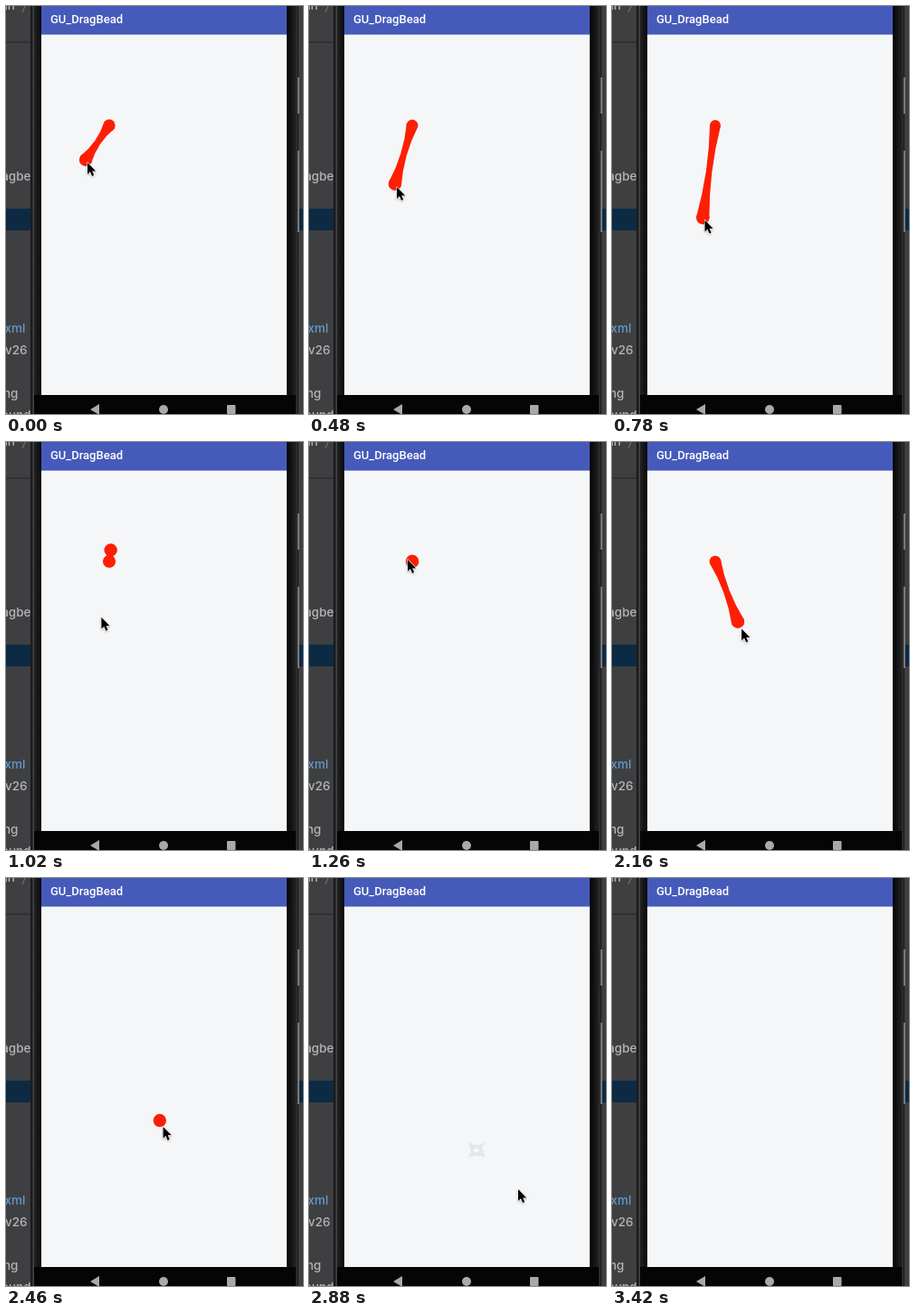
An HTML page for the animation above (3.6 s loop, 328 by 451 pixels).

```html
<!DOCTYPE html>
<html lang="en">
<head>
<meta charset="utf-8">
<title>Sticky bead</title>
<style>
  html, body { margin: 0; width: 100%; height: 100%; overflow: hidden; background: #3e3f41; }
  svg { display: block; width: 328px; height: 451px; }
  .label { font: 500 13.5px Inter, Roboto, sans-serif; fill: #b3b5b7; text-anchor: end; }
  .title { font: 500 13px Roboto, sans-serif; fill: #fff; }
  #pointer { filter: drop-shadow(0 1px 1px #0004); }
</style>
</head>
<body>
<svg viewBox="0 0 328 451">
  <defs>
    <linearGradient id="bezel">
      <stop offset="0" stop-color="#222"/>
      <stop offset=".03" stop-color="#080808"/>
      <stop offset=".97" stop-color="#080808"/>
      <stop offset="1" stop-color="#222"/>
    </linearGradient>
  </defs>
  <rect width="328" height="451" fill="#3e3f41"/>
  <rect y="39" width="28" height="2" fill="#303133"/>
  <rect y="224" width="328" height="24" fill="#0d2a44"/>
  <g class="label">
    <text x="10" y="4">in</text>
    <text x="27.5" y="193">agbe</text>
    <text x="21.5" y="361" style="fill:#6299cc">xml</text>
    <text x="23.5" y="385">v26</text>
    <text x="13.5" y="433">ng</text>
    <text x="27.5" y="457">ound</text>
  </g>
  <path d="M22 -2L18 7" stroke="#77797b" fill="none"/>

  <rect x="27" width="296" height="451" fill="#1b1b1c"/>
  <rect x="29.5" width="1.5" height="451" fill="#444546"/>
  <rect x="31" width="289" height="451" fill="url(#bezel)"/>
  <rect x="320" width="2" height="451" fill="#2b2c2d"/>
  <path d="M323 79V119M323 160V250" stroke="#77797a" stroke-width="2"/>

  <rect x="39" width="271" height="430" fill="#f5f6f8"/>
  <rect x="39" width="271" height="31.6" fill="#465aba"/>
  <text class="title" x="49" y="19">GU_DragBead</text>
  <rect x="31" y="430" width="289" height="21" fill="#050505"/>
  <g fill="#a9a9a9">
    <path d="M93 446L103 440V452Z"/>
    <circle cx="174" cy="446" r="5"/>
    <rect x="244" y="441" width="9.5" height="10" rx="1"/>
  </g>

  <g id="bead" fill="#fe1e04">
    <circle id="root" cx="114" cy="132"/>
    <path id="neck"/>
    <circle id="ball"/>
  </g>
  <path id="puff" fill="#e1e3e5"
        d="M-9 -9L-3 -6H3L9 -9L6 -2L10 8L3 6H-3L-10 8L-6 2ZM-4 0L-1 3L3 1L1 -3Z"/>
  <path id="pointer" d="M0 0V14L3.2 11.1L5.5 16.3L7.8 15.3L5.6 10.3H10Z"
        stroke="#fff" stroke-width="1.2" paint-order="stroke" stroke-linejoin="round"/>
</svg>
<script>
const LOOP = 3600, STEP = 60, LAG = 20;
const ROOT = { x: 114, y: 132 }, GRIP = { x: -2, y: -3 };
const BALL = 7.2, SNAP = 130;
const RELEASE = 840, SPRING = 240, GRAB = 1680, POP = 2700, FADE = 300, EXIT = 3420;

// Pointer stops: time, x, y
const stops = [
  [120, 90, 173], [480, 97, 200], [720, 102, 238], [RELEASE, 103, 235],
  [1260, 109, 130], [GRAB, 110, 132], [2730, 186, 303], [2880, 231, 344],
  [3240, 56, 429], [EXIT, 46, 452]
];

const [root, neck, ball, bead, puff, pointer] =
  ["root", "neck", "ball", "bead", "puff", "pointer"].map(id => document.getElementById(id));
const set = (el, attrs) => {
  for (const key in attrs) el.setAttribute(key, attrs[key]);
};
const show = (el, on) => set(el, { visibility: on ? "visible" : "hidden" });
const mix = (a, b, k) => ({ x: a.x + (b.x - a.x) * k, y: a.y + (b.y - a.y) * k });
const clamp = k => Math.min(1, Math.max(0, k));
const smooth = k => k * k * (3 - 2 * k);

function overshoot(k, tension = 3) {
  const u = k - 1;
  return u * u * ((tension + 1) * u + tension) + 1;
}

function pointerAt(t) {
  const next = stops.findIndex(s => s[0] > t);
  const i = next < 0 ? stops.length - 1 : Math.max(1, next);
  const [t0, x0, y0] = stops[i - 1], [t1, x1, y1] = stops[i];
  return mix({ x: x0, y: y0 }, { x: x1, y: y1 }, smooth(clamp((t - t0) / (t1 - t0))));
}

// The held ball trails the pointer slightly; a released one springs home.
function ballAt(t) {
  const free = t > RELEASE && t <= GRAB;
  const p = pointerAt(free ? RELEASE : t - LAG);
  const held = { x: p.x + GRIP.x, y: p.y + GRIP.y };
  return free ? mix(held, ROOT, overshoot(clamp((t - RELEASE) / SPRING))) : held;
}

function drawBead({ x, y }) {
  const dx = x - ROOT.x, dy = y - ROOT.y, dist = Math.hypot(dx, dy);
  const joined = dist < SNAP;
  const r = BALL - dist * 0.012;
  set(ball, { cx: x, cy: y, r: BALL });
  set(root, { r: joined ? r : 0 });
  if (!joined || dist < 1) return set(neck, { d: "" });
  const nx = -dy / dist, ny = dx / dist;
  const mid = `${ROOT.x + dx / 2} ${ROOT.y + dy / 2}`;
  const rim = (cx, cy, k) => `${cx + nx * k} ${cy + ny * k}`;
  set(neck, {
    d: `M${rim(ROOT.x, ROOT.y, r)}Q${mid} ${rim(x, y, BALL)}` +
       `L${rim(x, y, -BALL)}Q${mid} ${rim(ROOT.x, ROOT.y, -r)}Z`
  });
}

function render(time) {
  const t = Math.floor(time % LOOP / STEP) * STEP;
  const p = pointerAt(t);
  set(pointer, { transform: `translate(${p.x} ${p.y}) scale(.92)` });
  show(pointer, t < EXIT);

  show(bead, t < POP);
  if (t < POP) drawBead(ballAt(t));

  const k = (t - POP) / FADE;
  show(puff, k >= 0 && k < 1);
  set(puff, {
    transform: `translate(185 301) scale(${0.7 + 0.5 * k})`,
    opacity: 1 - 0.3 * k
  });
}

const start = performance.now();
function tick() {
  render(performance.now() - start);
  requestAnimationFrame(tick);
}
tick();
</script>
</body>
</html>
```
